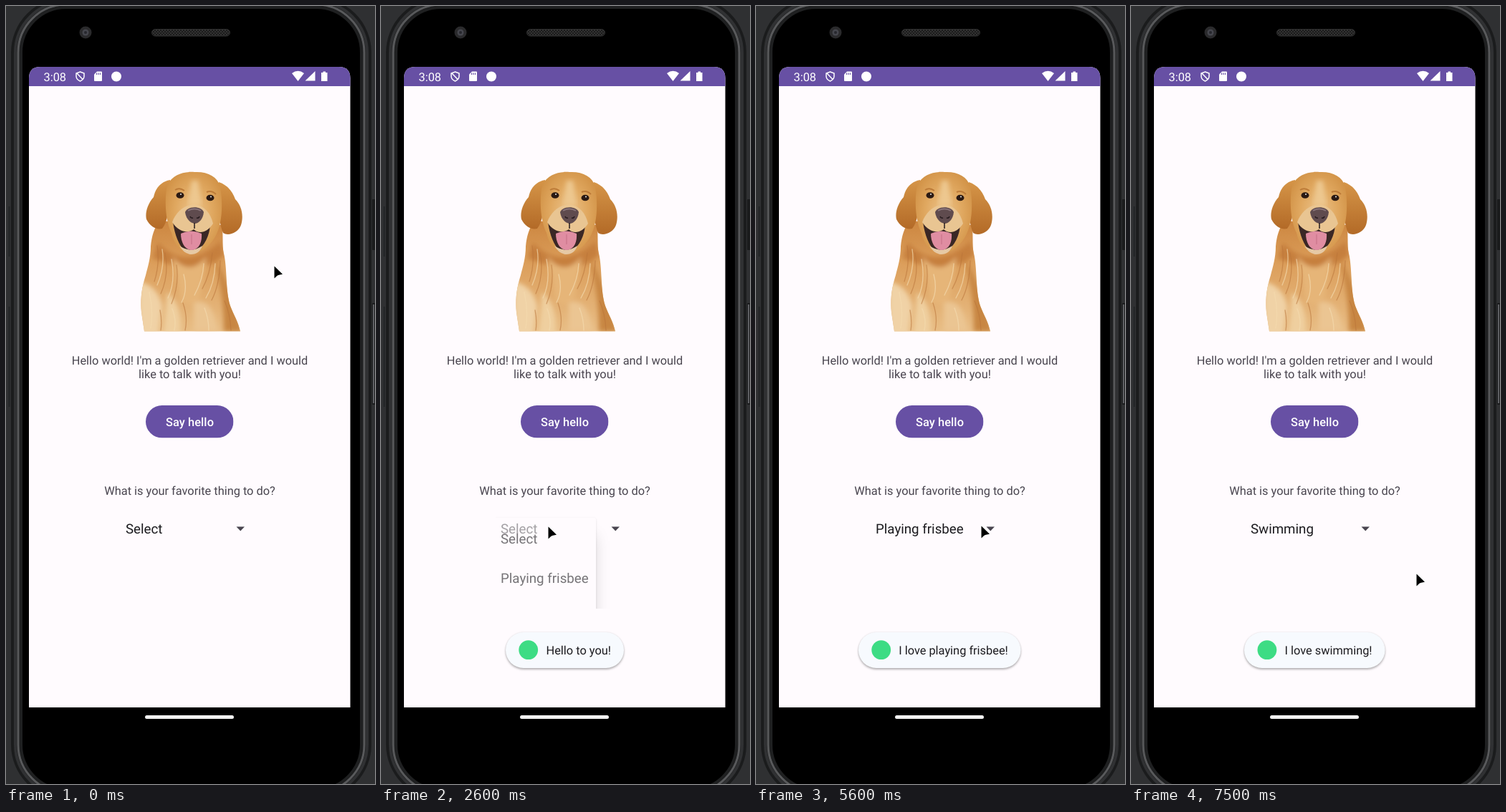
An HTML page that plays this animation: 515x1087 px, repeating every 8 s.

```html
<!DOCTYPE html>
<html lang="en">
<head>
<meta charset="utf-8">
<title>Talk with a golden retriever</title>
<style>
html, body { margin: 0; width: 100%; height: 100%; overflow: hidden; background: #2f3032; }
svg { display: block; width: 100%; height: 100%; font-family: Roboto, sans-serif; font-size: 16.36px; text-rendering: geometricPrecision; }
.center { text-anchor: middle; }
.body { fill: #49454f; }
.large { font-size: 18.72px; fill: #1c1b1f; }

/* 1.25% of the loop is 100 ms */
.move, .opening, .open, .choice, .toast, .ink, .press, .ripple { animation: 8s step-end infinite; }

.move { animation-name: move; }
@keyframes move {
  0% { transform: translate(374px, 363px) }
  1.25% { transform: translate(354px, 394px) }
  2.5% { transform: translate(312px, 462px) }
  3.75% { transform: translate(280px, 533px) }
  5% { transform: translate(263px, 577px) }
  6.25% { transform: translate(258px, 590px) }
  21.25% { transform: translate(250px, 620px) }
  22.5% { transform: translate(237px, 664px) }
  23.75% { transform: translate(234px, 696px) }
  25% { transform: translate(233px, 713px) }
  26.25% { transform: translate(233px, 721px) }
  27.5% { transform: translate(233px, 725px) }
  30% { transform: translate(233px, 727px) }
  37.5% { transform: translate(235px, 728px) }
  38.75% { transform: translate(238px, 728px) }
  41.25% { transform: translate(234px, 739px) }
  42.5% { transform: translate(227px, 757px) }
  43.75% { transform: translate(224px, 774px) }
  45% { transform: translate(222px, 785px) }
  46.25% { transform: translate(222px, 791px) }
  48.75% { transform: translate(221px, 794px) }
  53.75% { transform: translate(238px, 796px) }
  55% { transform: translate(286px, 794px) }
  56.25% { transform: translate(332px, 787px) }
  57.5% { transform: translate(354px, 783px) }
  62.5% { transform: translate(365px, 777px) }
  63.75% { transform: translate(358px, 767px) }
  65% { transform: translate(341px, 751px) }
  66.25% { transform: translate(328px, 739px) }
  67.5% { transform: translate(319px, 731px) }
  70% { transform: translate(314px, 726px) }
  77.5% { transform: translate(306px, 738px) }
  78.75% { transform: translate(287px, 762px) }
  80% { transform: translate(266px, 787px) }
  81.25% { transform: translate(261px, 810px) }
  82.5% { transform: translate(259px, 827px) }
  83.75% { transform: translate(258px, 838px) }
  85% { transform: translate(243px, 851px) }
  91.25% { transform: translate(275px, 842px) }
  92.5% { transform: translate(350px, 813px) }
  93.75% { transform: translate(398px, 793px) }
}

.press { transform-box: fill-box; transform-origin: center; animation-name: press; }
@keyframes press {
  0% { opacity: 0 }
  10% { opacity: .12; transform: scale(.4) }
  11.25% { opacity: .17; transform: scale(.75) }
  12.5% { opacity: .17; transform: none }
  13.75% { opacity: .1 }
  15% { opacity: .05 }
  16.25% { opacity: 0 }
}

.ripple { animation-name: ripple; }
@keyframes ripple {
  0%, 42.5%, 82.5% { opacity: 0 }
  35%, 76.25% { opacity: .05 }
  41.25%, 81.25% { opacity: .02 }
}

.opening { animation-name: opening; }
@keyframes opening {
  0%, 35%, 75% { opacity: 0 }
  32.5%, 73.75% { opacity: .6 }
}
.open { animation-name: open; }
@keyframes open {
  0%, 55%, 92.5% { opacity: 0 }
  35%, 75% { opacity: 1 }
  52.5%, 90% { opacity: .78 }
  53.75%, 91.25% { opacity: .35 }
}

.choice.first { animation-name: first; }
.choice.second { animation-name: second; }
.choice.third { animation-name: third; }
@keyframes first { 0% { opacity: 1 } 52.5% { opacity: 0 } }
@keyframes second { 0%, 90% { opacity: 0 } 52.5% { opacity: 1 } }
@keyframes third { 0% { opacity: 0 } 90% { opacity: 1 } }

.toast { transform-box: fill-box; transform-origin: center; }
.pill { fill: #f7fafe; filter: drop-shadow(0 2px 1.5px rgba(0, 0, 0, .27)) drop-shadow(0 0 1px rgba(0, 0, 0, .1)); }
.hello { animation-name: hello; }
.hello .ink { animation-name: hello-ink; }
.play { animation-name: play; }
.play .ink { animation-name: play-ink; }
.swim { animation-name: swim; }
.swim .ink { animation-name: swim-ink; }
@keyframes hello {
  0%, 43.75% { opacity: 0 }
  13.75% { opacity: .97; transform: scale(.97) }
  15% { opacity: 1; transform: none }
  42.5% { opacity: .82; transform: scale(.945) }
}
@keyframes hello-ink { 0%, 42.5% { opacity: 0 } 13.75% { opacity: .16 } 15% { opacity: .7 } 16.25% { opacity: 1 } }
@keyframes play {
  0%, 82.5% { opacity: 0 }
  52.5% { opacity: .97; transform: scale(.97) }
  53.75% { opacity: 1; transform: none }
  81.25% { opacity: .82; transform: scale(.945) }
}
@keyframes play-ink { 0%, 81.25% { opacity: 0 } 52.5% { opacity: .16 } 53.75% { opacity: .7 } 55% { opacity: 1 } }
@keyframes swim {
  0% { opacity: 0 }
  90% { opacity: .97; transform: scale(.97) }
  91.25% { opacity: 1; transform: none }
}
@keyframes swim-ink { 0% { opacity: 0 } 90% { opacity: .16 } 91.25% { opacity: .7 } 92.5% { opacity: 1 } }
</style>
</head>
<body>
<svg viewBox="0 0 515 1087" preserveAspectRatio="none">
  <defs>
    <pattern id="mesh" width="4" height="4" patternUnits="userSpaceOnUse">
      <rect width="4" height="4" fill="#1b1b1b"/>
      <path d="M0 4L4 0M0 0L4 4" stroke="#393939" stroke-width=".8"/>
    </pattern>
    <linearGradient id="coat" x1="0" y1="0" x2="0" y2="1">
      <stop offset="0" stop-color="#cc8640"/>
      <stop offset=".4" stop-color="#dc9f5c"/>
      <stop offset="1" stop-color="#e8bd85"/>
    </linearGradient>
    <linearGradient id="ear" x1="0" y1="0" x2="0" y2="1">
      <stop offset="0" stop-color="#d59548"/>
      <stop offset="1" stop-color="#b36a27"/>
    </linearGradient>
    <radialGradient id="face" cx=".5" cy=".5" r=".6">
      <stop offset="0" stop-color="#ecc48c"/>
      <stop offset=".55" stop-color="#e0a860"/>
      <stop offset="1" stop-color="#d09044"/>
    </radialGradient>
    <filter id="soft"><feGaussianBlur stdDeviation="3"/></filter>
    <filter id="deep" x="-50%" y="-50%" width="200%" height="200%"><feGaussianBlur stdDeviation="11"/></filter>
    <clipPath id="torso">
      <path id="torso-shape" d="M214 300C207 310 203 322 202 336C202 352 198 364 195 376C190 392 187 408 189 428L193 454.500H327C324 441 318 432 313 419C306 397 309 366 304 346C301 332 304 319 301 306Z"/>
    </clipPath>
    <clipPath id="button"><rect x="195" y="558" width="122.500" height="45.500" rx="22.750"/></clipPath>
    <clipPath id="half"><rect x="160" y="713" width="165" height="129"/></clipPath>
    <clipPath id="window"><rect x="120" y="700" width="220" height="272"/></clipPath>
    <rect id="shade" x="160" y="740" width="138" height="211" fill-opacity=".27" filter="url(#deep)"/>
    <g id="menu">
      <rect x="158" y="715" width="142" height="221" rx="2.500" fill="#fffbfe" style="filter: drop-shadow(0 1px 1.500px rgba(0, 0, 0, .2))"/>
      <g class="large">
        <text x="167" y="751.200">Select</text>
        <text x="167" y="806.100">Playing frisbee</text>
        <text x="167" y="861">Swimming</text>
        <text x="167" y="915.900">Going to a park</text>
      </g>
    </g>
  </defs>

  <!-- phone -->
  <rect width="515" height="1087" fill="#2f3032"/>
  <path d="M4.500 280V350M4.500 420V560" stroke="#232426" stroke-width="2"/>
  <rect x="511" y="270" width="5" height="71" rx="1" fill="#1a1b1c"/>
  <rect x="511" y="415" width="5" height="142" rx="1" fill="#1a1b1c"/>
  <path d="M513 417V555" stroke="#77797c" stroke-width="1.500"/>
  <g fill="none">
    <rect x="8" y="-11" width="501" height="1119" rx="76" fill="#1b1c1d" stroke="#1b1c1d" stroke-width="2"/>
    <rect x="13" y="-6" width="491" height="1109" rx="71" stroke="#303133" stroke-width="4"/>
    <rect x="17" y="-2" width="483" height="1101" rx="67" stroke="#58595b" stroke-width="3"/>
    <rect x="21" y="2" width="475" height="1093" rx="63" fill="#000" stroke="#1f2021" stroke-width="4"/>
  </g>
  <circle cx="111" cy="37" r="8.500" fill="#2a2a2c"/>
  <circle cx="111" cy="37" r="4.500" fill="#45464d"/>
  <circle cx="111" cy="37" r="2" fill="#27282d"/>
  <rect x="203.500" y="32.500" width="109" height="9.500" rx="4.750" fill="url(#mesh)" stroke="#303030"/>

  <!-- screen -->
  <path d="M32 980V101Q32 85 48 85H464.500Q480.500 85 480.500 101V980Z" fill="#fffbfe"/>
  <path d="M32 112V101Q32 85 48 85H464.500Q480.500 85 480.500 101V112Z" fill="#6750a4"/>
  <rect x="194" y="991" width="124" height="5" rx="2.500" fill="#f1f1f1"/>
  <g fill="#fff">
    <text x="52.500" y="104.800">3:08</text>
    <path d="M103.500 92L109 94V98.500Q108.500 103 103.500 105Q98.500 103 98 98.500V94ZM99 94L107.500 103" fill="none" stroke="#fff" stroke-width="1.500"/>
    <path d="M127 91.500H133Q134 91.500 134 92.500V104Q134 105 133 105H124Q123 105 123 104V95.500Z"/>
    <path d="M126.500 93.500V96M129 93.500V96M131.500 93.500V96" stroke="#6750a4" stroke-width="1.200"/>
    <circle cx="154" cy="98.500" r="7"/>
    <path d="M399 94Q407.500 87.500 416 94L407.500 105ZM431.500 91V104.500H417.500ZM442.500 91.500H446V93H448.500V105H440V93H442.500Z"/>
  </g>

  <!-- dog -->
  <use href="#torso-shape" fill="url(#coat)"/>
  <g clip-path="url(#torso)">
    <g filter="url(#soft)">
      <path d="M212 330Q250 372 300 328L304 348Q270 380 205 352Z" fill="#c67f3c"/>
      <path d="M232 350Q256 380 280 350L270 410Q256 425 244 410Z" fill="#e6b578"/>
      <path d="M185 385Q212 390 218 420L212 460H186Z" fill="#f0d2a6"/>
      <path d="M225 400Q248 420 243 460H220Z" fill="#efcf9f"/>
      <path d="M290 350Q315 390 330 455H304Q304 400 290 350Z" fill="#c88643"/>
      <path d="M262 415Q288 405 296 455H262Z" fill="#ebc592"/>
    </g>
    <g fill="none" stroke-width="1.300" stroke-linecap="round">
      <path d="M211 335Q215 360 207 385M222 345Q228 375 216 402M238 362Q242 390 231 416M288 345Q285 375 274 395M299 356Q298 390 287 411M247 415Q254 435 250 453M215 425Q218 440 216 453M305 412Q313 430 314 453" stroke="#b8743a" opacity=".55"/>
      <path d="M218 340Q222 365 211 390M231 354Q237 385 226 408M248 375Q254 398 245 414M276 360Q275 382 263 404M292 360Q291 388 279 408M200 400Q206 425 202 450M232 423Q238 438 235 453M277 422Q283 437 283 453" stroke="#f4daae" opacity=".7"/>
    </g>
  </g>
  <path d="M229 243C214 246 208 257 206 267C197 277 194 290 196 298C201 308 210 313 218 311C226 301 226 286 231 270Z" fill="url(#ear)"/>
  <path d="M297 246C309 250 316 259 320 270C329 279 332 293 328 306C324 317 310 322 303 317C297 303 296 280 297 262Z" fill="url(#ear)"/>
  <path d="M225 250C233 235 248 231 263 232C281 231 295 238 299 252C303 278 302 307 291 324C281 340 269 346 258 346C245 345 235 335 231 317C222 300 221 270 225 250Z" fill="url(#face)"/>
  <path d="M233 302Q256 320 285 306Q283 330 266 343H250Q237 330 233 302Z" fill="#3a2725"/>
  <path d="M242 335Q258 346 274 335Q270 347 258 347Q248 346 242 335Z" fill="#e6c9a5"/>
  <path d="M244 318Q259 311 273 318C274 332 268 341 258 341C250 340 244 331 244 318Z" fill="#e08da2"/>
  <path d="M259 319V333" stroke="#c66f86"/>
  <path d="M232 302C238 286 250 278 263 277C277 279 286 290 289 304C281 317 269 319 262 312C254 318 241 316 232 302Z" fill="#e9c592"/>
  <path d="M254 279L259 244H268L273 279Z" fill="#edc78f" filter="url(#soft)"/>
  <path d="M250 288C253 279 273 279 276 288C275 298 269 304 263 304C257 303 251 297 250 288Z" fill="#5f4b4e"/>
  <path d="M254 286Q263 281 272 286" fill="none" stroke="#88747a" stroke-width="2"/>
  <path d="M257 294Q258 297 261 296M266 296Q269 297 270 294M263 303V311" fill="none" stroke="#261b1e" stroke-width="1.500"/>
  <g fill="#2b1a13">
    <ellipse cx="243" cy="264.500" rx="5.500" ry="4.300"/>
    <ellipse cx="285" cy="268" rx="5.500" ry="4.300"/>
  </g>
  <path d="M236 257Q242 253 249 258M280 260Q287 257 293 263" fill="none" stroke="#bd7b38" stroke-width="2"/>
  <g fill="#eee"><circle cx="244" cy="263" r="1"/><circle cx="286" cy="266.500" r="1"/></g>

  <!-- page -->
  <g class="center body">
    <text x="256.500" y="501">Hello world! I'm a golden retriever and I would</text>
    <text x="256.500" y="520.200">like to talk with you!</text>
    <text x="256.500" y="683.200">What is your favorite thing to do?</text>
  </g>
  <g clip-path="url(#button)">
    <rect x="195" y="558" width="122.500" height="45.500" fill="#6750a4"/>
    <circle class="press" cx="258" cy="588" r="68" fill="#fff"/>
  </g>
  <text class="center" x="256.500" y="587" font-weight="500" letter-spacing=".1" fill="#fff">Say hello</text>

  <g class="large">
    <text class="choice first" x="167" y="737.300">Select</text>
    <text class="choice second" x="167" y="737.300">Playing frisbee</text>
    <text class="choice third" x="167" y="737.300">Swimming</text>
  </g>
  <circle class="ripple" cx="327.500" cy="730" r="22.500"/>
  <path d="M321.500 727.500H333L327.250 733.500Z" fill="#49454f"/>

  <!-- drop-down: half revealed, then whole -->
  <g clip-path="url(#half)">
    <g class="opening"><use href="#shade"/><use href="#menu"/></g>
  </g>
  <g clip-path="url(#window)">
    <g class="open"><use href="#shade"/></g>
    <g class="open"><use href="#menu"/></g>
  </g>

  <!-- toasts -->
  <g class="toast hello">
    <rect class="pill" x="174" y="875" width="165" height="50" rx="25"/>
    <g class="ink">
      <circle cx="205.700" cy="899.700" r="13.400" fill="#3ddc84"/>
      <text x="230.500" y="906" fill="#1c1b1f">Hello to you!</text>
    </g>
  </g>
  <g class="toast play">
    <rect class="pill" x="143" y="875" width="226.500" height="50" rx="25"/>
    <g class="ink">
      <circle cx="174.700" cy="899.700" r="13.400" fill="#3ddc84"/>
      <text x="199.200" y="906" fill="#1c1b1f">I love playing frisbee!</text>
    </g>
  </g>
  <g class="toast swim">
    <rect class="pill" x="158" y="875" width="196.500" height="50" rx="25"/>
    <g class="ink">
      <circle cx="189.900" cy="899.700" r="13.400" fill="#3ddc84"/>
      <text x="214.500" y="906" fill="#1c1b1f">I love swimming!</text>
    </g>
  </g>

  <path class="move" d="M.5 .5V17.500L4.500 13.800Q5.500 13 7 12.700L12 11.700Z" stroke="#fff" stroke-opacity=".8" stroke-width="1.200" paint-order="stroke"/>
</svg>
</body>
</html>
```
